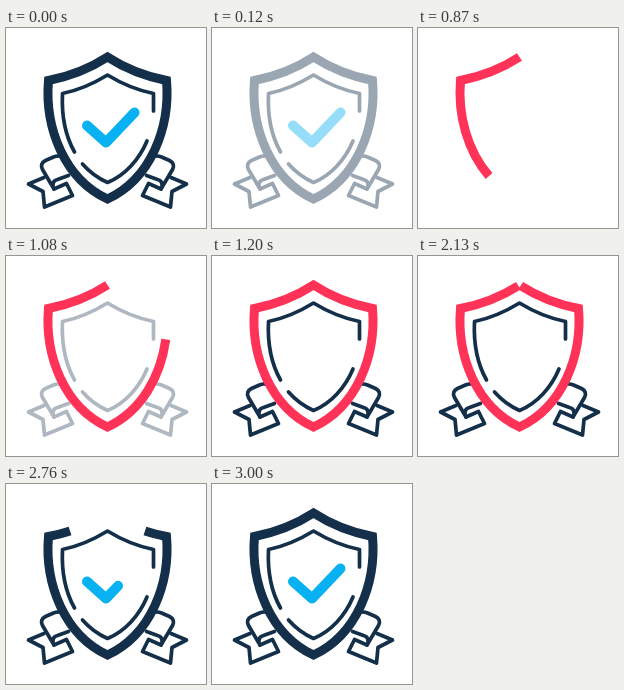
Animation of 200x200 px, one loop 3600 ms. Source, as an HTML page:

```html
<!DOCTYPE html>
<html lang="en">
<head>
<meta charset="utf-8">
<title>Shield</title>
<style>
html, body { margin: 0; width: 100%; height: 100%; overflow: hidden; background: #fff; }
svg { display: block; width: 100vw; height: 100vh; }
</style>
</head>
<body>
<svg viewBox="0 0 200 200" fill="none">
  <g id="art" transform="translate(.5 0)">
    <g id="detail" stroke="#142f49" stroke-width="3.7" stroke-linecap="round" stroke-linejoin="round">
      <g id="ribbon">
        <path d="M59.5 133C57 128.5 52 127 47 129L39 132.5C35 134.5 34 138 36 141.5L47.5 161C45 156 47 152.5 51 151.5L62 147.5"/>
        <path d="M47.5 161L60 155.5L66 167.5L38 179L36.5 163.5L22 156L37.5 149.5"/>
      </g>
      <use href="#ribbon" transform="matrix(-1 0 0 1 202 0)"/>
      <path d="M147 83V65.5C130 62 114 55 101 47C88 55 73 62 56 65.5C55 86 59 108 68 124"/>
      <path d="M76 136C83 144 91 150 101 154.5C119 147 133 131 140.5 113"/>
    </g>
    <g id="rings" stroke-width="9" stroke-miterlimit="8"></g>
    <path id="check" d="M80.5 97.5L99.5 114.5L128 84.5" pathLength="1" stroke="#08b1f1" stroke-width="10" stroke-linecap="round" stroke-linejoin="round"/>
  </g>
</svg>
<script>
const LOOP = 3600;
const SHIELD = 'M101 29C84 40 65 48 42 52.5C38 100 58 151 101 171C144 151 164 100 160 52.5C137 48 118 40 101 29Z';
const NAVY = [20, 47, 73], RED = [255, 51, 88];
const $ = id => document.getElementById(id);

function addRing() {
  const p = document.createElementNS('http://www.w3.org/2000/svg', 'path');
  p.setAttribute('d', SHIELD);
  p.setAttribute('pathLength', 1);
  return $('rings').appendChild(p);
}
const red = addRing(), navy = addRing();
navy.setAttribute('stroke', `rgb(${NAVY})`);

const span = (t, a, b) => Math.min(1, Math.max(0, (t - a) / (b - a)));
const ease = x => (1 - Math.cos(Math.PI * x)) / 2;
const mix = (a, b, k) => `rgb(${a.map((v, i) => Math.round(v + (b[i] - v) * k))})`;

// Show only the part of a path between two fractions of its length.
function trim(path, from, to) {
  const len = to - from;
  path.style.display = len > 0 ? '' : 'none';
  path.setAttribute('stroke-dasharray', len >= 1 ? 'none' : `0 ${from} ${len} 2`);
}

function draw(t) {
  const first = t < 480;
  $('art').setAttribute('opacity', first ? 1 - span(t, 0, 210) : 1);
  $('detail').setAttribute('opacity', first ? 1 : span(t, 1020, 1200));

  // Red runs round from the top, then shrinks evenly to the lower point.
  const grow = Math.pow(span(t, 507, 1200), 1.4);
  const cut = ease(span(t, 2110, 2520)) / 2;
  red.setAttribute('stroke', mix(NAVY, RED, span(t, 500, 600)));
  trim(red, cut, t < 2110 ? grow : 1 - cut);

  // Navy spreads from the lower point up both sides.
  const half = first ? 0.5 : ease(span(t, 2340, 2940)) / 2;
  trim(navy, 0.5 - half, 0.5 + half);

  trim($('check'), 0, first ? 1 : ease(span(t, 2415, 3000)));
}

const start = performance.now();
function tick() {
  draw((performance.now() - start) % LOOP);
  requestAnimationFrame(tick);
}
tick();
</script>
</body>
</html>
```
